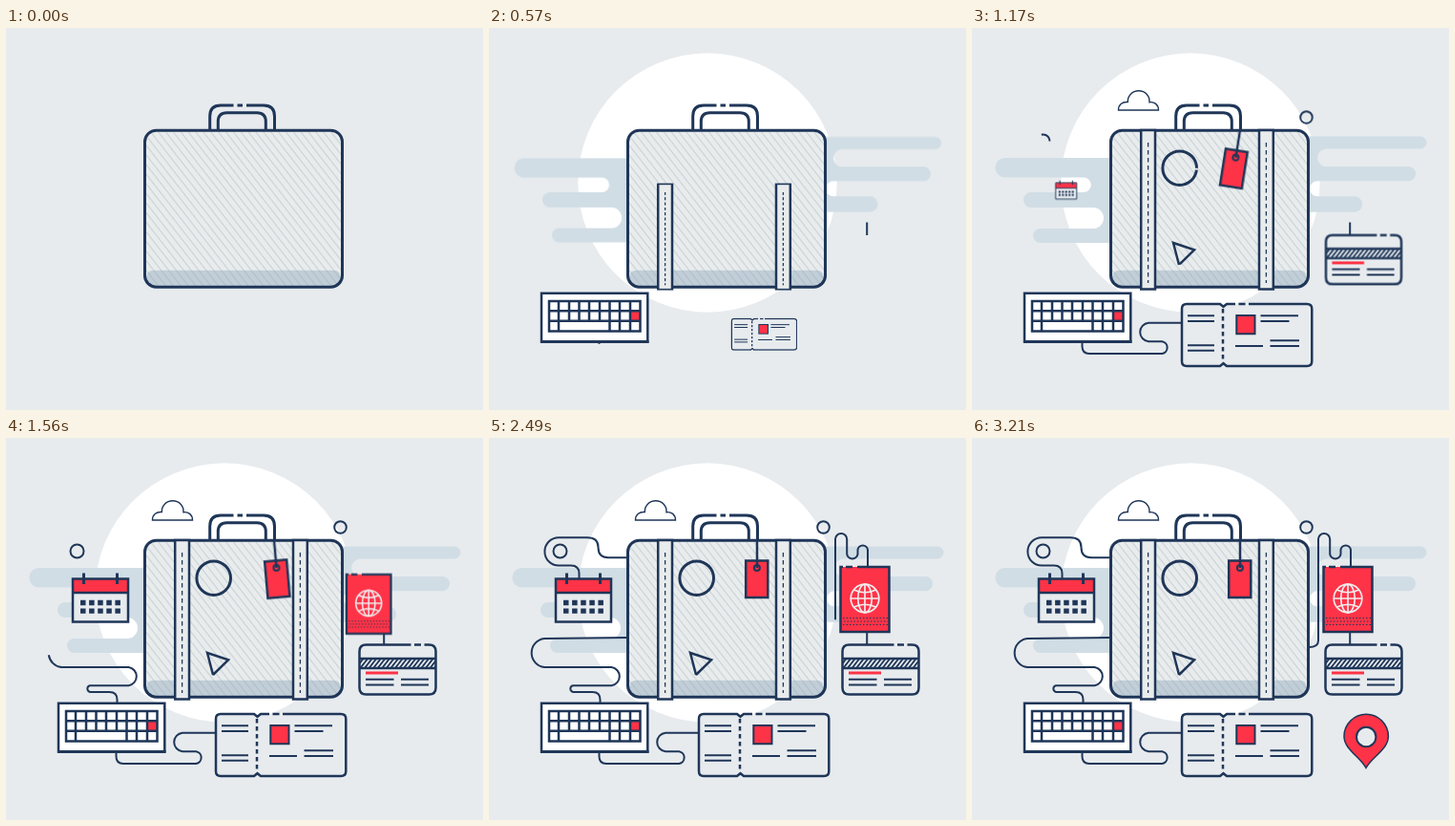
Animation, 500 px wide and 400 px high, one loop 3.27 s. Source, as an HTML page:

```html
<!DOCTYPE html>
<html lang="en">
<head>
<meta charset="utf-8">
<title>Packed suitcase</title>
<style>
  :root {
    --bg: #e7ebee; --ink: #1f3658; --red: #ff3347; --mist: #d1dde5; --case: #e9ecec;
    --out: cubic-bezier(.5, 1, .89, 1);
    --soft: cubic-bezier(.25, 1, .5, 1);
    --both: cubic-bezier(.45, 0, .55, 1);
  }
  html, body { margin: 0; width: 100%; height: 100%; overflow: hidden; background: var(--bg); }
  svg { display: block; width: 100vw; height: 100vh; fill: none; stroke: var(--ink); stroke-width: 2; }
  .bg { fill: var(--bg); }
  .red { fill: var(--red); }
  .case { fill: var(--case); }
  .thick { stroke-width: 3; }
  .mid { stroke-width: 2.5; }
  .plain { stroke: none; }

  .anim { animation: 3.27s var(--out) infinite; }
  .draw { stroke-dasharray: 1 1.2; animation: 3.27s var(--both) infinite; }

  #disc { animation-name: disc; animation-timing-function: var(--soft); transform-origin: 229px 162px; }
  #mist { animation-name: mist; animation-timing-function: var(--soft); transform-origin: 250px 170px; }
  #keys { animation-name: keys; transform-origin: 110.5px 303.5px; }
  #straps { animation-name: straps; transform-origin: 247px 274px; }
  #ticket { animation-name: ticket; transform-origin: 288.5px 320px; }
  #puff { animation-name: puff; transform-origin: 174.5px 77px; }
  #swing { animation-name: swing; animation-timing-function: var(--both); transform-origin: 281px 107px; }
  #tag { animation-name: tag; animation-timing-function: linear; transform-origin: 281px 107px; }
  #card { animation-name: card; transform-origin: 410.5px 243.5px; }
  #dot { animation-name: dot; transform-origin: 350.5px 93.5px; }
  #calendar { animation-name: calendar; transform-origin: 98.5px 171px; }
  #passport { animation-name: passport; transform-origin: 235px 225px; }
  #pin { animation-name: pin; transform-origin: 413px 318px; }

  #link { animation-name: link; }
  #wire-ticket { animation-name: wire-ticket; }
  #wire-keys { animation-name: wire-keys; }
  #wire-calendar { animation-name: wire-calendar; }
  #wire-passport { animation-name: wire-passport; }
  #ring { animation-name: ring; animation-timing-function: var(--out); }
  .sticker { animation-name: sticker; animation-timing-function: var(--soft); }

  @keyframes disc { 0%, .9% { transform: scale(0); } 16.5%, to { transform: scale(1); } }
  @keyframes mist { 0%, .9% { transform: scale(0); } 24.2%, to { transform: scale(1); } }
  @keyframes keys { 0%, 4.6% { transform: scale(0); } 16.4%, to { transform: scale(1); } }
  @keyframes straps { 0%, 12.5% { transform: scaleY(0); } 24.3%, to { transform: scaleY(1); } }
  @keyframes ticket { 0%, 14% { transform: scale(0); } 25.8%, to { transform: scale(1); } }
  @keyframes puff { 0%, 18.3% { transform: scale(0); } 26.9%, to { transform: scale(1); } }
  @keyframes tag { 0%, 22% { transform: scaleY(0); } 30.3%, to { transform: scaleY(1); } }
  @keyframes swing {
    0% { transform: rotate(0deg); }
    22% { transform: rotate(0deg); animation-timing-function: var(--out); }
    33% { transform: rotate(10deg); }
    47.7% { transform: rotate(-5deg); }
    57% { transform: rotate(2.5deg); }
    65%, to { transform: rotate(0deg); }
  }
  @keyframes card { 0%, 25.4% { transform: scale(0); } 37.2%, to { transform: scale(1); } }
  @keyframes dot { 0%, 28.4% { transform: scale(0); } 36.7%, to { transform: scale(1); } }
  @keyframes calendar { 0%, 33.3% { transform: scale(0); } 45.1%, to { transform: scale(1); } }
  @keyframes passport { 0%, 37.4% { transform: scale(0); } 52.1%, to { transform: scale(1); } }
  @keyframes pin { 0%, 83.5% { transform: scale(0); } 97.9%, to { transform: scale(1); } }

  @keyframes link { 0%, 14.7% { stroke-dashoffset: 1; } 17.2%, to { stroke-dashoffset: 0; } }
  @keyframes wire-ticket { 0%, 16.5% { stroke-dashoffset: 1; } 34.9%, to { stroke-dashoffset: 0; } }
  @keyframes sticker { 0%, 18.5% { stroke-dashoffset: 1; } 45.1%, to { stroke-dashoffset: 0; } }
  @keyframes ring { 0%, 33.6% { stroke-dashoffset: 1; } 47.6%, to { stroke-dashoffset: 0; } }
  @keyframes wire-keys { 0%, 36.1% { stroke-dashoffset: 1; } 56.1%, to { stroke-dashoffset: 0; } }
  @keyframes wire-calendar { 0%, 49.5% { stroke-dashoffset: 1; } 65.7%, to { stroke-dashoffset: 0; } }
  @keyframes wire-passport { 0%, 56.6% { stroke-dashoffset: 1; } 84.4%, to { stroke-dashoffset: 0; } }
</style>
</head>
<body>
<svg viewBox="0 0 500 400">
  <defs>
    <pattern id="hatch" width="6.2" height="6" patternUnits="userSpaceOnUse" patternTransform="rotate(-38)">
      <path d="M3 0V6" stroke="#8fa5b3" stroke-opacity=".4" stroke-width="1"/>
    </pattern>
    <pattern id="stripe" width="3.6" height="4" patternUnits="userSpaceOnUse" patternTransform="rotate(38)">
      <path d="M1.8 0V4" stroke="#1f3658" stroke-width="1.8"/>
    </pattern>
    <g id="strap">
      <path class="case mid" d="M177.2 107H192V273.5H177.2Z"/>
      <path d="M184.6 120V267" stroke-width="1.3" stroke-dasharray="4.5 3.5"/>
    </g>
  </defs>

  <circle id="disc" class="anim plain" cx="229" cy="162" r="135.7" fill="#fff"/>
  <g id="mist" class="anim plain" fill="#d1dde5">
    <path d="M150 136H34.5a10.2 10.2 0 0 0 0 20.4H117a7.8 7.8 0 0 1 0 15.6H62a8 8 0 0 0 0 16H127a11 11 0 0 1 0 22H71.5a7.5 7.5 0 0 0 0 15H150Z"/>
    <path d="M350 113.5H470a6.5 6.5 0 0 1 0 13H371.500a9.300 9.300 0 0 0 0 18.600H457.500a7.600 7.600 0 0 1 0 15.200H362a8 8 0 0 0 0 16H401a8.200 8.200 0 0 1 0 16.400H350Z"/>
  </g>

  <!-- wires -->
  <path id="link" class="draw" pathLength="1" d="M396.200 203.500V217"/>
  <path id="wire-ticket" class="draw" pathLength="1" d="M115.500 330V333.500Q115.500 341 123 341H199.300A6.500 6.500 0 0 0 199.300 328.200H185A9.800 9.800 0 0 1 185 308.700H221"/>
  <path id="wire-keys" class="draw" pathLength="1" d="M116.500 278V274Q116.500 266 108.500 266H88A3.500 3.500 0 0 1 88 259.200H128.500A9.700 9.700 0 0 0 128.500 240H58A15.100 15.100 0 0 1 58 210L146 209"/>
  <path id="wire-calendar" class="draw" pathLength="1" d="M94.500 148V142Q94.500 133.500 86 133.500H73A14.600 14.600 0 0 1 73 104.300H103Q114.500 104.300 114.500 114.500Q114.500 125.200 125 125.200H146"/>
  <path id="wire-passport" class="draw" pathLength="1" d="M397 135V117A5.300 5.300 0 0 0 386.500 117V121.500A5.700 5.700 0 0 1 375.200 121.500V106A6.100 6.100 0 0 0 363 106V212Q363 219 353 219"/>

  <g id="passport" class="anim">
    <path class="red plain" d="M368.500 135H419.500V203H368.500Z"/>
    <path class="mid" d="M371 135H368.500V203H419.500V135H386M374 135H381"/>
    <g stroke="#f0ecee" stroke-width="1.700">
      <circle cx="394" cy="168" r="14.800"/>
      <ellipse cx="394" cy="168" rx="7.300" ry="14.800"/>
      <path d="M394 153V183M379 168H409M382.500 159Q394 164.500 405.500 159M382.500 177Q394 171.500 405.500 177"/>
    </g>
    <path d="M371 188.500H418M372 192H418M371 195.500H418" stroke-width="1" stroke-dasharray="1.500 2"/>
  </g>

  <!-- suitcase -->
  <g>
    <rect class="case plain" x="145.500" y="107.200" width="207" height="164" rx="12"/>
    <path class="plain" fill="#c1ced7" d="M147 262Q147 253.800 155 253.800H343Q351 253.800 351 262Q350 270 341 270H157Q148 270 147 262Z"/>
    <rect class="plain" x="147" y="109" width="204" height="161" rx="11" fill="url(#hatch)"/>
    <rect class="thick" x="145.500" y="107.200" width="207" height="164" rx="12"/>
    <path class="thick" d="M213.700 107V92.500Q213.700 81 225 81H238.500M242.500 81H248M252 81H270Q281.500 81 281.500 92.500V107M222.300 107V98Q222.300 88.700 231.500 88.700H263Q272.300 88.700 272.300 98V107"/>
  </g>
  <g id="straps" class="anim">
    <use href="#strap"/>
    <use href="#strap" x="123.800"/>
  </g>
  <path class="draw sticker thick" pathLength="1" d="M235.500 146.700A17.800 17.800 0 1 0 199.900 146.700A17.800 17.800 0 1 0 235.500 146.700"/>
  <path class="draw sticker mid" pathLength="1" d="M217 248L211 225L233 232.300Z"/>

  <g id="swing" class="anim">
    <g id="tag" class="anim">
      <path class="red mid" d="M269.200 128.500H292.300V167H269.200Z"/>
      <circle cx="280.900" cy="136" r="3"/>
      <path class="mid" d="M281 106V136"/>
    </g>
  </g>

  <path id="puff" class="anim" stroke-width="1.400" d="M153.500 86H195.500C195.500 80 191 77 186 77.700C186.500 71 181.500 65.800 174.700 65.800C168 65.800 163 71 163.300 77.500C157.500 77 153.300 80.500 153.500 86Z"/>
  <circle id="dot" class="anim" cx="350.500" cy="93.500" r="6.300"/>
  <path id="ring" class="draw" pathLength="1" d="M81.500 118.500A7 7 0 1 0 67.500 118.500A7 7 0 1 0 81.500 118.500"/>

  <g id="calendar" class="anim">
    <path class="bg plain" d="M70 147.500H128V193H70Z"/>
    <path class="red plain" d="M70 147.500H128V162H70Z"/>
    <path class="mid" d="M70 147.500H128V192.500H70ZM70 162H128"/>
    <path class="thick" d="M81.500 141.500V153M116.500 141.500V153"/>
    <path d="M78 172.500H121M78 181.200H121" stroke-width="5.300" stroke-dasharray="5.500 3.600"/>
  </g>

  <g id="keys" class="anim">
    <path class="mid" fill="#fff" d="M55 277.800H166.300V328.500H55Z"/>
    <path d="M54 328.500H167.500" class="thick"/>
    <path class="red plain" d="M148.500 296H159V307H148.500Z"/>
    <path class="mid" d="M63 286H158.500V317.500H63ZM63 296.300H158.500M63 306.700H158.500M73 286V317.500M84 286V306M94.500 286V306M105 286V306M116 286V306M126.500 286V317.500M137 286V317.500M148 286V317.500"/>
  </g>

  <g id="ticket" class="anim">
    <path class="bg plain" d="M225 289H260L263.500 291.500L267 289H351Q356.300 289 356.300 294V349Q356.300 354 351 354H267L263.500 351.500L260 354H225Q220 354 220 349V294Q220 289 225 289Z"/>
    <path class="mid" d="M276 289H267L263.500 291.800L260 289H225Q220 289 220 294V349Q220 354 225 354H260L263.500 351.200L267 354H351Q356.300 354 356.300 349V294Q356.300 289 351 289H290M279.500 289H286.500"/>
    <path class="mid" d="M263 294V350" stroke-dasharray="4.500 3.500"/>
    <path class="red" d="M277.300 301H296.500V320.300H277.300Z"/>
    <path d="M226 301.300H254M226 307H254M226 332.200H254M226 337.800H254M302.500 301.300H342M302.500 307H332.500M276 333H305M312.500 327.300H343M312.500 333H343"/>
  </g>

  <g id="card" class="anim">
    <rect class="bg plain" x="370.500" y="216.500" width="80" height="52" rx="7"/>
    <path class="plain" fill="url(#stripe)" d="M371 231H450V241H371Z"/>
    <path class="mid" d="M424.500 216.500H377.500Q370.500 216.500 370.500 223.500V261.500Q370.500 268.500 377.500 268.500H443.500Q450.500 268.500 450.500 261.500V223.500Q450.500 216.500 443.500 216.500H438.500M428 216.500H435M370.500 231H450.500M370.500 241H450.500"/>
    <path d="M377 246H411" stroke="#ff3347" stroke-width="3"/>
    <path d="M377 252.700H406.500M377 258.500H406.500M414 252.700H443M414 258.500H443"/>
  </g>

  <g id="pin" class="anim">
    <path class="red" stroke-width="1.500" d="M413 345.500C407 334 390 326 390 312.500A23.200 23.200 0 0 1 436.400 312.500C436.400 326 419 334 413 345.500Z"/>
    <circle class="bg" cx="413.200" cy="313" r="10.200"/>
  </g>
</svg>
</body>
</html>
```
